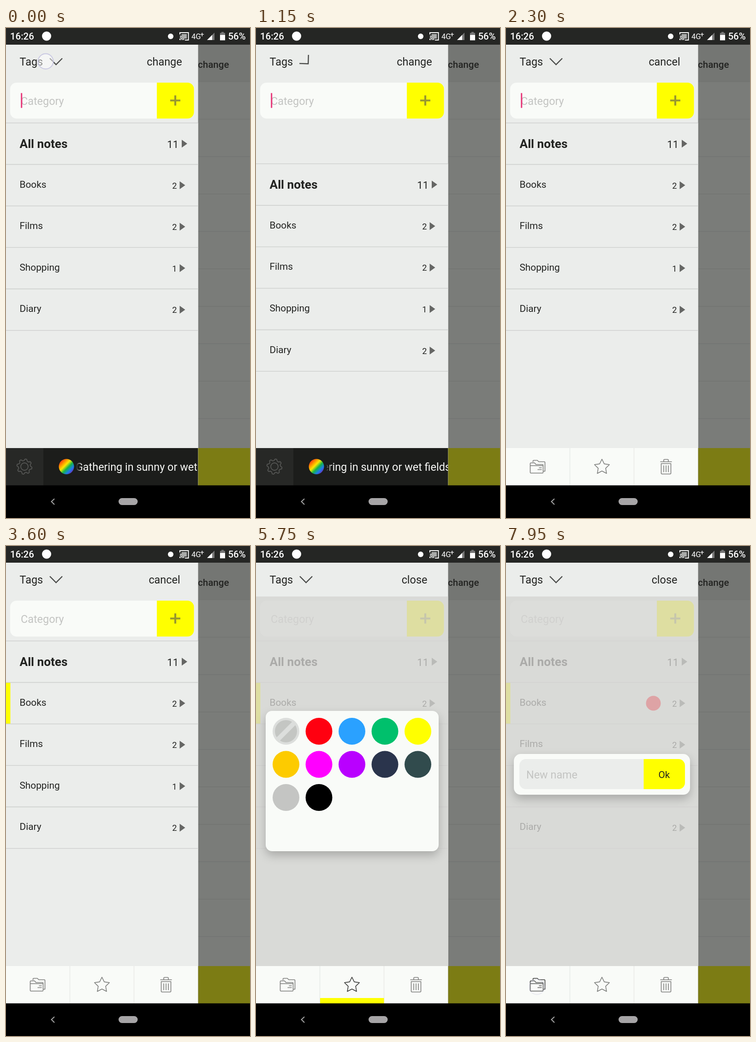
These frames come from a looping animation (529 by 1058 pixels, 8 s). An HTML page:

```html
<!DOCTYPE html>
<html lang="en">
<head>
<meta charset="utf-8">
<title>Notes drawer</title>
<style>
html, body { margin: 0; height: 100%; overflow: hidden; background: #000; }
svg { display: block; width: 100%; height: 100%; font-family: Roboto, sans-serif; font-size: 23.4px; fill: #222321; }
.mid { text-anchor: middle; }
.end { text-anchor: end; }
.small { font-size: 20.8px; }
.hint { fill: #c3c4c2; }
.line { stroke: #d0d2d0; stroke-width: 1.6; }
.icon { fill: none; stroke: #7d7e7c; stroke-width: 1.6; stroke-linejoin: round; stroke-linecap: round; }
.icon.on { stroke: #3a3b39; }
.pop { filter: drop-shadow(0 9px 10px rgba(0,0,0,.22)); }
</style>
</head>
<body>
<svg id="stage" viewBox="0 0 529 1058" preserveAspectRatio="none"></svg>
<script>
const LOOP = 8000;
const rect = (x, y, w, h, fill, r = 0, more = '') =>
  `<rect x="${x}" y="${y}" width="${w}" height="${h}" fill="${fill}" rx="${r}" ${more}/>`;
const disc = (x, y, r, fill, more = '') => `<circle cx="${x}" cy="${y}" r="${r}" fill="${fill}" ${more}/>`;
const text = (x, y, s, more = '') => `<text x="${x}" y="${y}" ${more}>${s}</text>`;
const path = (d, more = '') => `<path d="${d}" ${more}/>`;
const group = (id, body, more = '') => `<g id="${id}" ${more}>${body}</g>`;
const polar = (cx, cy, r, a) => `${(cx + r * Math.cos(a)).toFixed(1)} ${(cy + r * Math.sin(a)).toFixed(1)}`;
const ring = (n, at) => 'M' + Array.from({ length: n }, (_, i) => at(i)).join('L') + 'Z';

const starPath = ring(10, i => polar(208, 948, i % 2 ? 8.5 : 17, (i / 5 - .5) * Math.PI));
const gearPath = ring(32, i => polar(40, 947, i % 4 < 2 ? 16.5 : 13, (i + .5) * Math.PI / 16));

function row(i, name, count) {
  const y = 205 + i * 89.6, big = i === 0, x = big ? 381 : 376.5, c = y + 44.8;
  return path(`M0 ${y}H416.5`, 'class="line"')
    + text(29.5, big ? 259 : y + 50, name, big ? 'font-size="26.2" font-weight="700"' : 'class="small"')
    + text(big ? 374 : 370.5, big ? 258.5 : y + 52, count, `class="end" font-size="${big ? 22 : 18.2}"`)
    + path(`M${x} ${c - 8.5}l12 8.5l-12 8.5z`, 'fill="#656664"');
}

const pill = (x, y, w, s) => rect(x, y, w, 32, 'url(#pill)', 16)
  + text(x + w / 2, y + 22, s, 'class="mid small" fill="#f4f5f3"');

function palette() {
  const colors = ['#dcdedc', '#ff0010', '#2aa1ff', '#00c06c', '#ff0', '#fdcb00',
    '#f0f', '#b900ff', '#2a344c', '#314b4d', '#c4c5c3', '#000'];
  return rect(21, 356, 375, 303, '#f9fbf8', 14, 'class="pop"')
    + colors.map((c, i) => disc(65 + i % 5 * 71.5, 400 + Math.floor(i / 5) * 71.5, 29, c)).join('')
    + disc(65, 400, 24, '#c4c6c3') + path('M48 417L82 383', 'stroke="#dcdedc" stroke-width="10"');
}

const dialog = rect(17, 464, 382, 88, '#f9fbf8', 15, 'class="pop"')
  + rect(29, 475, 300, 65, '#ebedeb', 14)
  + path('M298.5 475h75.500a14 14 0 0 1 14 14v37a14 14 0 0 1 -14 14h-75.500z', 'fill="#ff0"')
  + text(44, 517, 'New name', 'class="hint"') + text(343, 516, 'Ok', 'class="mid small"');

const backdrop = rect(416, 36, 113, 871, '#7a7c79') + rect(416, 36, 113, 80, '#747673')
  + Array.from({ length: 10 }, (_, i) => rect(416, 115.5 + i * 80.8, 113, 1.2, '#717370')).join('')
  + text(416, 85.500, 'change', 'font-size="20.6" font-weight="500"')
  + rect(416, 907, 113, 81, '#7c7c14');

const status = rect(0, 0, 529, 36, '#252624') + `<g fill="#fff">`
  + text(9, 25, '16:26', 'font-size="20.4" font-weight="500"') + disc(88, 17.5, 10, '#fff')
  + disc(357, 18, 6, '#fff')
  + path('M377 14V10H395.500V26H388M377 17.500a8.500 8.500 0 0 1 8.500 8.500M377 21a5 5 0 0 1 5 5', 'fill="none" stroke="#fff" stroke-width="2"')
  + rect(380.5, 13, 11.5, 10, '#a9aaa8') + path('M376 23a3 3 0 0 1 3 3h-3z')
  + text(402, 24, '4G', 'font-size="16.5"') + text(421, 19, '+', 'font-size="15"')
  + path('M436 26L452 10V26z', 'fill="#777"') + path('M436 26L447 15V26z')
  + path('M464 10.500h3v-2h5v2h3v16h-11z', 'fill="#777"') + rect(464, 15, 11, 11.5, '#fff')
  + text(481.5, 25, '56%', 'font-size="20.4" font-weight="500"') + '</g>';

const player = rect(0, 907, 416.5, 81, '#1c1d1b')
  + `<g clip-path="url(#ticker)">${text(0, 956, 'Gathering in sunny or wet fields', 'id="song" fill="#f6f7f5"')}</g>`
  + rect(152, 925, 13, 45, 'url(#fade)') + rect(0, 907, 81, 81, '#272826')
  + disc(131, 947, 16.5, 'url(#cover)')
  + path(gearPath, 'fill="none" stroke="#555654" stroke-width="1.8" stroke-linejoin="round"')
  + disc(40, 947, 8, 'none', 'stroke="#555654" stroke-width="1.8"');

const tools = rect(0, 907, 416.5, 81, '#f9fbf8')
  + path('M138.500 907V988M277.500 907V988', 'stroke="#e8eae7" stroke-width="1.5"')
  + group('folder', path('M58.500 937V935a1.500 1.500 0 0 1 1.500 -1.500h8l3 3h12a1.500 1.500 0 0 1 1.500 1.500v19h-4'
    + 'M52.500 940.500a1.500 1.500 0 0 1 1.500 -1.500h8l3 3.500h14a1.500 1.500 0 0 1 1.500 1.500v15.500a1.500 1.500 0 0 1 -1.500 1.500h-25a1.500 1.500 0 0 1 -1.500 -1.500z'
    + 'M52.500 945H80.500M72 949.500h5M69 953.500h8'), 'class="icon"')
  + group('star', path(starPath), 'class="icon"')
  + path('M335 936.500H359M342 936v-3a1.500 1.500 0 0 1 1.500 -1.500h7a1.500 1.500 0 0 1 1.500 1.500v3'
    + 'M336.500 940.500H357.500V961a2 2 0 0 1 -2 2h-17a2 2 0 0 1 -2 -2zM342 945v13.500M347 945v13.500M352 945v13.500', 'class="icon"')
  + rect(139, 976, 138.5, 12, '#ff0', 0, 'id="mark"');

const stage = document.getElementById('stage');
stage.innerHTML = `<defs>
  <linearGradient id="pill" x2="0" y2="1"><stop stop-color="#555654"/><stop offset=".3" stop-color="#262725"/><stop offset="1" stop-color="#1f201e"/></linearGradient>
  <linearGradient id="fade"><stop stop-color="#1c1d1b"/><stop offset="1" stop-color="#1c1d1b" stop-opacity="0"/></linearGradient>
  <linearGradient id="cover" x2="1" y2="1">${['#f42a1c', '#ff8a00', '#ffe600', '#16b44a', '#1d7cf0', '#7a1fb0']
    .map((c, i) => `<stop offset="${.1 + i * .16}" stop-color="${c}"/>`).join('')}</linearGradient>
  <clipPath id="ticker"><rect x="152" y="907" width="264.5" height="81"/></clipPath>
  <clipPath id="drawer"><rect y="36" width="416.5" height="952"/></clipPath>
  </defs>` + backdrop + `<g clip-path="url(#drawer)">`
  + rect(0, 36, 417, 871, '#ebedeb')
  + text(29.5, 81, 'Tags')
  + path('M95 65.500L108.500 79L122 65.500', 'id="chevron" fill="none" stroke="#4a4b49" stroke-width="2.400"')
  + text(343.5, 81, '', 'id="action" class="mid"')
  + rect(9, 118, 398.5, 77.5, '#f9fbf8', 14)
  + text(32, 166, '', 'id="field" class="hint"')
  + group('add', path('M327 118h66.500a14 14 0 0 1 14 14v49.500a14 14 0 0 1 -14 14h-66.500z', 'fill="#ff0"')
    + path('M356 156.500h22M367 145.500v22', 'stroke="#97972f" stroke-width="4.200"'))
  + rect(32.2, 140.5, 3, 32, '#e8387a', 0, 'id="caret"')
  + group('tags', pill(21, 222, 114, 'useless') + pill(155, 222, 78, 'late') + pill(21, 272, 134, 'important'))
  + group('list', rect(0, 205, 417, 800, '#ebedeb')
    + rect(0, 295, 9.5, 89, '#ff0', 0, 'id="chosen"') + disc(319.5, 339.5, 16, '#ff0010', 'id="dot"')
    + row(0, 'All notes', 11) + row(1, 'Books', 2) + row(2, 'Films', 2) + row(3, 'Shopping', 1) + row(4, 'Diary', 2)
    + path('M0 653H416.500', 'class="line"'))
  + rect(0, 109, 417, 798, '#d4d5d2', 0, 'id="veil"')
  + group('palette', palette()) + group('dialog', dialog)
  + group('player', player) + group('tools', tools) + '</g>'
  + status + rect(0, 987.5, 529, 71, '#000')
  + path('M105 1016.500L98.500 1022.500L105 1029', 'fill="none" stroke="#a5a5a5" stroke-width="2"')
  + rect(244, 1015, 41.5, 15, '#a7a5a7', 7.5)
  + disc(0, 0, 16.5, '#fff', 'id="tap" fill-opacity=".5" stroke="#c9c8e2" stroke-width="2"');

const $ = Object.fromEntries([...stage.querySelectorAll('[id]')].map(e => [e.id, e]));
const clamp = v => Math.max(0, Math.min(1, v));
const ramp = (t, start, len) => clamp((t - start) / len);
const show = (el, on) => el.setAttribute('visibility', on ? 'visible' : 'hidden');
const shift = (el, y) => el.setAttribute('transform', `translate(0 ${y})`);

// cubic-bezier(.25, .1, .25, 1)
function ease(x) {
  let lo = 0, hi = 1, s;
  for (let i = 0; i < 20; i++) {
    s = (lo + hi) / 2;
    if (.75 * s * (1 - s) + s ** 3 < x) lo = s; else hi = s;
  }
  return .3 * s * (1 - s) ** 2 + 3 * s * s * (1 - s) + s ** 3;
}
const move = (t, start, len = 300) => ease(ramp(t, start, len));

// Rises from below, overshoots by 15 and settles.
const popY = (t, start) => 600 - 615 * move(t, start, 150) + 15 * move(t, start + 150, 200);

// x, y, start, end
const taps = [[86, 72, 0, 150], [86, 72, 850, 1060], [343, 72, 1720, 1920], [150, 340, 2500, 2700],
  [208, 947, 4050, 4380], [136, 400, 5760, 6000], [67, 952, 7750, 8000]];

function draw(t) {
  const open = move(t, 55) - move(t, 1013), tagMode = t >= 50 && t < 1013;
  shift($.list, 367 * open);
  $.chevron.setAttribute('transform', `rotate(${-180 * open} 108.5 72.2)`);
  $.field.textContent = tagMode ? 'tag' : 'Category';
  show($.add, !tagMode);
  show($.tags, tagMode);
  show($.caret, !tagMode && t < 4050 && (t < 50 || t % 1000 >= 50 && t % 1000 < 550));
  $.action.textContent = t < 1850 ? 'change' : t < 4300 ? 'cancel' : 'close';

  $.song.setAttribute('x', 151 - (t < 550 ? t * 31 / 550 : 31 + (t - 550) * .04));
  shift($.tools, 81 * (1 - move(t, 1850)));
  show($.tools, t > 1850);

  show($.chosen, t >= 2600);
  show($.dot, t >= 6000);
  $.veil.setAttribute('opacity', .77 * (ramp(t, 4300, 150) - ramp(t, 6050, 250) + ramp(t, 7750, 150)));
  shift($.palette, popY(t, 4350) + 600 * ramp(t, 6000, 250) ** 2);
  show($.palette, t > 4350 && t < 6250);
  shift($.dialog, popY(t, 7800));
  show($.dialog, t > 7800);

  const rise = 12 * (move(t, 4520) - move(t, 6000));
  $.mark.setAttribute('y', 988 - rise);
  $.mark.setAttribute('height', rise);
  $.star.classList.toggle('on', t >= 4300 && t < 6000);
  $.folder.classList.toggle('on', t >= 7750);

  const tap = taps.find(([, , a, b]) => t >= a && t < b);
  show($.tap, tap);
  if (tap) {
    $.tap.setAttribute('cx', tap[0]);
    $.tap.setAttribute('cy', tap[1]);
    $.tap.setAttribute('opacity', clamp((tap[3] - t) / 150));
  }
}

const began = performance.now();
function tick() {
  draw((performance.now() - began) % LOOP);
  requestAnimationFrame(tick);
}
tick();
</script>
</body>
</html>
```
